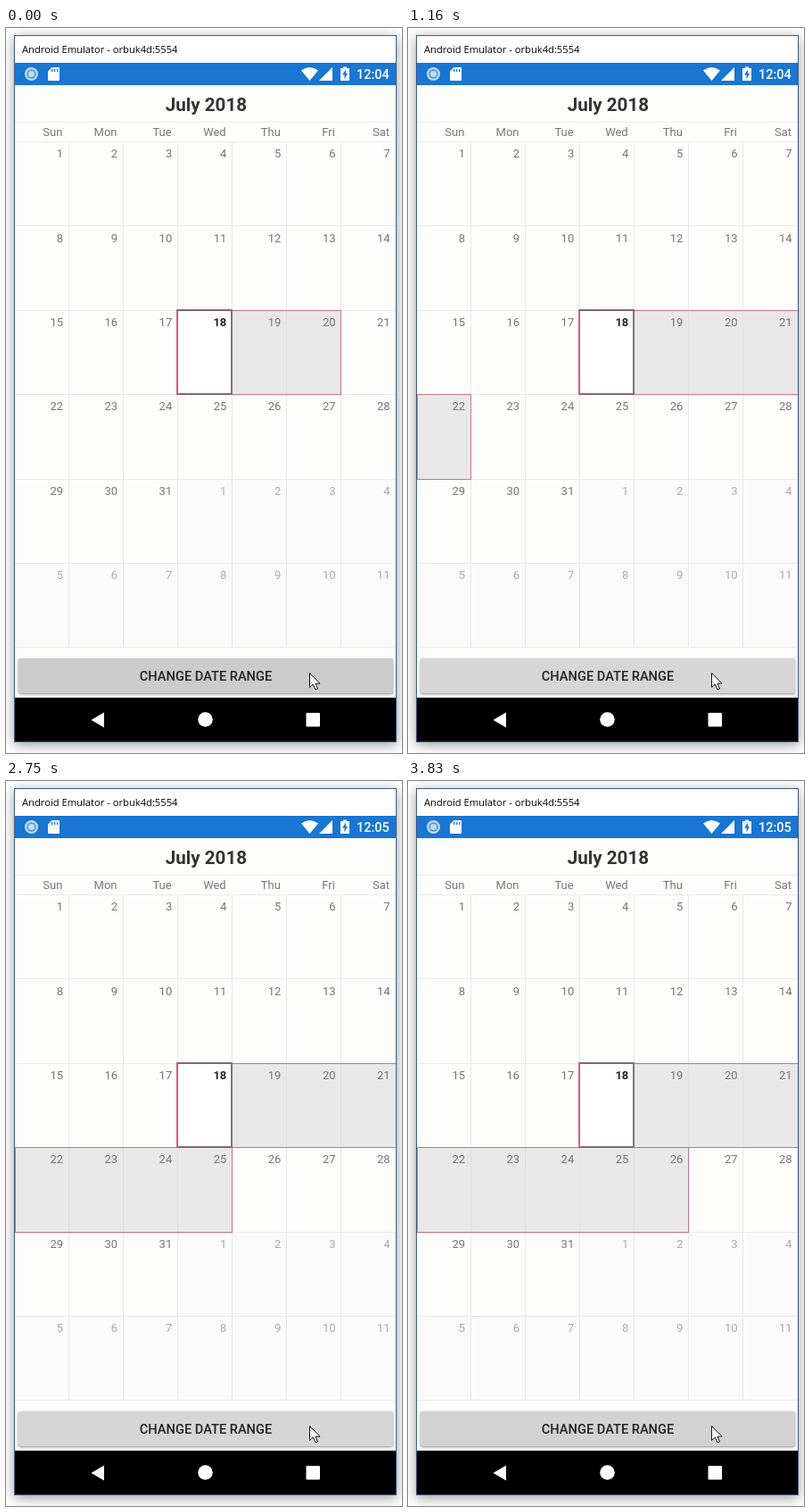
Recreate the animation shown at these times as an HTML page with a canvas. Size 444 px wide and 812 px high, loop 3.91 s.

```html
<!DOCTYPE html>
<html lang="en">
<head>
<meta charset="utf-8">
<title>Calendar date range</title>
<style>
html, body { margin: 0; width: 100%; height: 100%; overflow: hidden; background: #fff; }
canvas { display: block; }
</style>
</head>
<body>
<canvas width="444" height="812"></canvas>
<script>
const ctx = document.querySelector('canvas').getContext('2d');
const LOOP = 3910;
const CLICKS = [80, 1000, 1500, 2330, 2660, 3160, LOOP + 80];
const DAYS = ['Sun', 'Mon', 'Tue', 'Wed', 'Thu', 'Fri', 'Sat'];
const TODAY = 18, FIRST_END = 20;
const PINK = '#c9708a';

const colX = c => c === 0 ? 10 : c === 7 ? 437 : 9 + 61 * c;
const rowY = r => Math.round(127 + 94.4 * r);

function rect(x, y, w, h, color) {
  ctx.fillStyle = color;
  ctx.fillRect(x, y, w, h);
}

function text(str, x, y, font, color, align = 'left') {
  ctx.font = font;
  ctx.fillStyle = color;
  ctx.textAlign = align;
  ctx.fillText(str, x, y);
}

function disc(x, y, r, color) {
  ctx.fillStyle = color;
  ctx.beginPath();
  ctx.arc(x, y, r, 0, 7);
  ctx.fill();
}

function roundRect(x, y, w, h, r, color) {
  ctx.fillStyle = color;
  ctx.beginPath();
  ctx.roundRect(x, y, w, h, r);
  ctx.fill();
}

function shape(d, fill, stroke) {
  const path = new Path2D(d);
  ctx.fillStyle = fill;
  ctx.fill(path);
  if (stroke) {
    ctx.strokeStyle = stroke;
    ctx.lineWidth = 1;
    ctx.stroke(path);
  }
}

function shadow(color, blur, y) {
  ctx.shadowColor = color;
  ctx.shadowBlur = blur;
  ctx.shadowOffsetY = y;
}

function drawWindow() {
  rect(0, 0, 444, 812, '#fff');
  shadow('rgba(0,0,0,.4)', 13, 3);
  rect(9, 8, 429, 792, '#3d5a85');
  shadow('transparent', 0, 0);
  rect(10, 9, 427, 790, '#fff');
  text('Android Emulator - orbuk4d:5554', 18, 28, '11.2px "Open Sans", sans-serif', '#000');
}

function drawStatusBar(clock) {
  rect(10, 39, 427, 25, '#1976d2');
  disc(28.5, 51.5, 7.5, '#c3dbf2');
  disc(28.5, 51.5, 5.2, '#4f94da');
  disc(28.5, 51.5, 3.6, '#c3dbf2');
  shape('M51.5 44H59a1 1 0 0 1 1 1V58a1 1 0 0 1-1 1H48a1 1 0 0 1-1-1V48.5Z', '#fff');
  for (const x of [51, 54, 57]) rect(x, 46, 1.3, 3, '#1976d2');
  shape('M331 47.5Q340.5 40.5 350 47.5L340.5 59Z', '#fff');
  shape('M366 44V59H351Z', '#fff');
  shape('M378 43.5h4V45h3V59H375V45h3Z', '#fff');
  shape('M381 46.5L377 52.5H379.5V57.5L383 51H381Z', '#1976d2');
  text(clock, 429.8, 57, '500 14.5px Roboto, sans-serif', '#fff', 'right');
}

// July starts on a Sunday, so day 1 sits in the first cell.
function cell(day) {
  const c = (day - 1) % 7, r = Math.floor((day - 1) / 7);
  const x = colX(c), y = rowY(r);
  return { c, r, x, y, w: colX(c + 1) - x, h: rowY(r + 1) - y };
}

function drawRange(end) {
  const cells = [];
  for (let day = TODAY + 1; day <= end; day++) cells.push(cell(day));
  for (const { c, x, y, w, h } of cells) {
    rect(x, y, w, h, '#e8e8e8');
    if (c) rect(x, y, 1, h, '#dededf');
  }
  for (const { c, x, y, w, h } of cells) {
    rect(x, y, w, 1, PINK);
    rect(x, y + h, w, 1, PINK);
    if (c === 0) rect(x, y, 1, h, PINK);
  }
  const last = cells.at(-1);
  if (last.c < 6) rect(last.x + last.w, last.y, 1, last.h + 1, PINK);
}

function drawToday() {
  rect(192, 316, 62, 95, '#fff');
  rect(191, 315, 63, 2, '#86666f');
  rect(191, 409, 63, 2, '#86666f');
  rect(252, 315, 2, 96, '#777');
  rect(191, 315, 2, 96, '#e0567a');
}

function drawCalendar(end) {
  rect(10, 64, 427, 686, '#fdfdfc');
  text('July 2018', 224.4, 93, '700 20.6px Roboto, sans-serif', '#333', 'center');
  rect(10, 105, 427, 1, '#ececec');
  rect(193, rowY(4), 244, 94, '#fafafb');
  rect(10, rowY(5), 427, 94, '#fafafb');
  for (let r = 0; r <= 6; r++) rect(10, rowY(r), 427, 1, '#eaeaec');
  for (let c = 1; c < 7; c++) rect(colX(c), 127, 1, 567, '#e8e8ec');

  drawRange(end);
  drawToday();

  DAYS.forEach((name, c) =>
    text(name, 63.4 + 61.1 * c, 121, '13px Roboto, sans-serif', '#777', 'right'));
  for (let day = 1; day <= 42; day++) {
    const { c, r } = cell(day), next = day > 31, today = day === TODAY;
    text(next ? day - 31 : day, 64 + 61.1 * c, Math.round(145.2 + 94.4 * r),
      (today ? '700 ' : '') + '13px Roboto, sans-serif',
      today ? '#222' : next ? '#aaa' : '#757575', 'right');
  }
}

function drawButton(shade) {
  shadow('rgba(0,0,0,.45)', 3, 1);
  roundRect(14, 706, 420, 39, 2, `rgb(${shade},${shade},${shade})`);
  shadow('transparent', 0, 0);
  text('CHANGE DATE RANGE', 224, 731, '500 14.6px Roboto, sans-serif', '#222', 'center');
}

function drawNavBar() {
  rect(10, 750, 427, 49, '#000');
  shape('M95.5 775L110 766.5V783.5Z', '#fff');
  disc(223.5, 774.5, 8.3, '#fff');
  roundRect(336.5, 767, 15.5, 15.5, 1, '#fff');
}

function drawCursor() {
  shape('M340.5 722.5V738.5L344.3 735L347 741L349.5 740L347 734.2H352Z', '#fff', '#111');
}

// How far the button has darkened: quick press before a click, quick release after.
function pressDepth(t) {
  return Math.max(0, ...CLICKS.map(click => {
    const lead = click - t;
    return lead >= 0 ? Math.min(11, (200 - lead) / 9) : 11 * (1 + lead / 80);
  }));
}

function draw(now) {
  // The screen refreshes twelve times a second.
  const step = LOOP / 47;
  const t = Math.floor(now % LOOP / step) * step;
  const end = FIRST_END + CLICKS.filter(click => t >= click).length;
  drawWindow();
  drawStatusBar(t < 2500 ? '12:04' : '12:05');
  drawCalendar(end);
  drawButton(Math.round(214 - pressDepth(t)));
  drawNavBar();
  drawCursor();
  requestAnimationFrame(draw);
}
requestAnimationFrame(draw);
</script>
</body>
</html>
```
